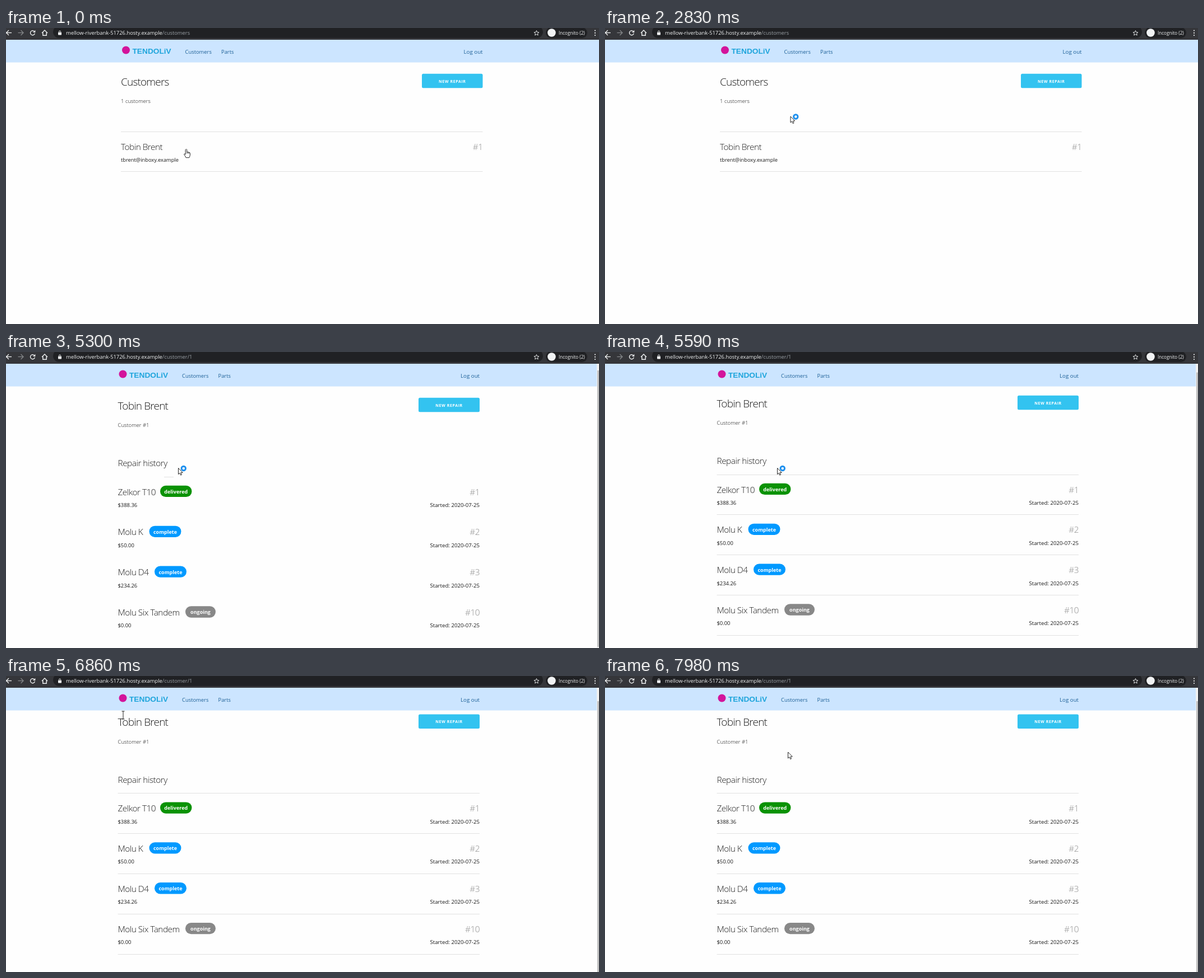
An HTML page with a canvas for the animation above (8 s loop, 1058 by 529 pixels).

```html
<!DOCTYPE html>
<html lang="en">
<head>
<meta charset="utf-8">
<title>Repair shop customers</title>
<style>
  html, body { margin: 0; width: 100%; height: 100%; overflow: hidden; background: #fefefe; }
  canvas { display: block; }
</style>
</head>
<body>
<canvas id="stage" width="1058" height="529"></canvas>
<script>
const ctx = document.getElementById('stage').getContext('2d');
const LOOP = 8000;
const SANS = '"Open Sans", "Noto Sans", sans-serif';
const CUSTOMER = 'Tobin Brent';
const HOST = 'mellow-riverbank-51726.hosty.example';
const BLUE = '#3390ff';
const INK = '#1a1a1a';
const PITCH = 71.85;

const REPAIRS = [
  { name: 'Zelkor T10', price: '$388.36', id: '#1', tag: 'delivered', color: '#0b9204', x: 275, w: 56.5 },
  { name: 'Molu K', price: '$50.00', id: '#2', tag: 'complete', color: '#0099ff', x: 255.5, w: 57 },
  { name: 'Molu D4', price: '$234.26', id: '#3', tag: 'complete', color: '#0099ff', x: 265, w: 57 },
  { name: 'Molu Six Tandem', price: '$0.00', id: '#10', tag: 'ongoing', color: '#888888', x: 320, w: 54 }
];

// Pointer steps: start time, shape, hot spot
const POINTER = [
  [0, 'hand', 321.5, 216.5],
  [660, 'hand', 262, 214], [790, 'hand', 211.5, 206], [920, 'hand', 470, 202],
  [1050, 'hand', 833, 206], [1180, 'arrow', 700, 150], [1310, 'arrow', 510, 90],
  [1440, 'hand', 360, 38], [1570, 'hand', 342, 43.5],
  [1940, 'busy', 352, 50], [2060, 'busy', 344, 98], [2180, 'busy', 337, 144],
  [2830, 'busy', 331, 158], [2950, 'busy', 310, 188], [3080, 'hand', 291.5, 218],
  [3510, 'busy', 291, 217], [3710, 'hand', 291.5, 218],
  [4860, 'hand', 283, 217], [5010, 'arrow', 292, 190],
  [5150, 'arrow', 301, 199], [5300, 'busy', 307.5, 207.5],
  [6330, 'arrow', 290, 180], [6465, 'arrow', 246, 124], [6600, 'beam', 209, 84],
  [6735, 'beam', 209, 70], [6870, 'beam', 232, 78], [7000, 'beam', 262, 84],
  [7135, 'beam', 288, 90], [7270, 'arrow', 310, 100],
  [7390, 'ring', 319.5, 120], [7540, 'ring', 321, 124],
  [7690, 'arrow', 323, 128], [7840, 'arrow', 325, 133], [7980, 'arrow', 326.5, 136]
];

function pointerAt(t) {
  return POINTER.findLast(p => p[0] <= t);
}

function rect(x, y, w, h, color, r = 0) {
  ctx.fillStyle = color;
  ctx.beginPath();
  ctx.roundRect(x, y, w, h, r);
  ctx.fill();
}

function disc(x, y, r, color) {
  ctx.fillStyle = color;
  ctx.beginPath();
  ctx.arc(x, y, r, 0, Math.PI * 2);
  ctx.fill();
}

function path(points, close) {
  ctx.beginPath();
  points.forEach(([x, y]) => ctx.lineTo(x, y));
  if (close) ctx.closePath();
}

function stroke(points, color, width = 1.3, close = false) {
  path(points, close);
  ctx.strokeStyle = color;
  ctx.lineWidth = width;
  ctx.stroke();
}

function text(str, x, y, size, color, { weight = 400, align = 'left', gap = 0, font = SANS } = {}) {
  ctx.font = `${weight} ${size}px ${font}`;
  ctx.letterSpacing = gap + 'px';
  ctx.textAlign = align;
  ctx.fillStyle = color;
  ctx.fillText(str, x, y);
  return ctx.measureText(str).width;
}

const heading = (str, x, y, color = INK) =>
  text(str, x, y, 19, color, { weight: 300, gap: -0.8 });
const title = (str, x, y, color = INK, align = 'left') =>
  text(str, x, y, 15.4, color, { weight: 300, gap: -0.5, align });
const note = (str, x, y, color = '#111') =>
  text(str, x, y, 9.5, color, { weight: 300 });
const divider = (x, y, w) => rect(x, Math.round(y), w, 1, '#e1e1e1');

function button(x, y, w) {
  rect(x, y, w, 25.5, '#33c3f0', 2.5);
  text('NEW REPAIR', x + w / 2, y + 16, 7, '#fff', { weight: 700, gap: 0.6, align: 'center' });
}

function browserBar(t) {
  const white = '#f1f3f4';
  rect(0, 0, 1058, 21, '#35363a');
  rect(84, -4, 874, 22, '#202124', 11);
  rect(963, -1, 74, 19, '#202124', 9.5);

  stroke([[10, 8.5], [0.5, 8.5]], white);
  stroke([[5, 4], [0.5, 8.5], [5, 13]], white);
  stroke([[21.5, 8.5], [31, 8.5]], '#85878a');
  stroke([[26.5, 4], [31, 8.5], [26.5, 13]], '#85878a');

  if (t >= 3910 && t < 4430) {
    stroke([[44, 5], [51, 12]], white);
    stroke([[51, 5], [44, 12]], white);
  } else {
    ctx.strokeStyle = white;
    ctx.lineWidth = 1.4;
    ctx.beginPath();
    ctx.arc(47.5, 8.7, 4, 0.25, Math.PI * 1.75);
    ctx.stroke();
    ctx.fillStyle = white;
    path([[52.3, 3.8], [52.3, 8], [48, 8]], true);
    ctx.fill();
  }

  stroke([[64, 9], [69, 4], [74, 9]], white, 1.4);
  stroke([[65.8, 8], [65.8, 13.2], [72.2, 13.2], [72.2, 8]], white, 1.4);

  rect(93, 7.5, 6, 5, white, 0.7);
  ctx.strokeStyle = white;
  ctx.lineWidth = 1;
  ctx.beginPath();
  ctx.arc(96, 6.8, 1.7, Math.PI, 0);
  ctx.stroke();

  const w = text(HOST, 107, 12, 9.4, white);
  text(t < 4180 ? '/customers' : '/customer/1', 107 + w, 12, 9.4, '#9aa0a6');

  const star = Array.from({ length: 10 }, (_, i) => {
    const a = -Math.PI / 2 + i * Math.PI / 5, r = i % 2 ? 2.1 : 4.7;
    return [946.5 + r * Math.cos(a), 9.2 + r * Math.sin(a)];
  });
  stroke(star, white, 0.9, true);
  disc(973.5, 8.5, 7.3, white);
  text('Incognito (2)', 986, 11.7, 8.1, white);
  [4.5, 8.8, 13].forEach(y => disc(1051, y, 1.1, white));
}

function siteHeader(x, w) {
  rect(0, 21, w, 40.5, '#cce5ff');
  disc(x + 9, 39.5, 7, '#d3149b');
  text('TENDOLiV', x + 20.5, 46.2, 13.7, '#1fa5dc', { weight: 700, font: '"Liberation Sans", Arial, sans-serif' });
  const link = '#1c5f96';
  text('Customers', x + 114.5, 45.5, 9.4, link);
  text('Parts', x + 179, 45.5, 9.4, link);
  text('Log out', x + 645.5, 45.5, 9.7, link, { align: 'right' });
}

function customerList() {
  heading('Customers', 205, 102.6);
  button(742, 81.8, 108.5);
  note('1 customers', 205, 134.2);
  divider(205, 185, 645.5);
  title(CUSTOMER, 205, 217.6);
  title('#1', 850.5, 217.6, '#8c8c8c', 'right');
  text('tbrent@inboxy.example', 205, 239, 9.3, INK);
  divider(205, 256, 645.5);
}

function loadingPage() {
  button(739, 81.8, 111.5);
  note('Customer #1', 205, 126.2);
  title('Repair history', 205, 195.6);
}

// Selected words get a blue box and white letters
function marked(draw, str, x, y, from, to, top, h) {
  const full = draw(str, x, y);
  if (to <= from) return;
  const end = Math.min(to, x + full + 5);
  rect(from, top, end - from, h, BLUE);
  ctx.save();
  ctx.beginPath();
  ctx.rect(from, top, end - from, h);
  ctx.clip();
  draw(str, x, y, '#fff');
  ctx.restore();
}

function customerPage(t, scroll) {
  const x = 199.5, right = 845, firstLine = 222.6;
  const dragging = t >= 6870 && t < 7690;
  const both = t >= 7390;
  const nameEnd = !dragging ? 0 : t >= 7135 ? 999 : pointerAt(t)[2];

  ctx.save();
  ctx.translate(0, -scroll);
  marked(heading, CUSTOMER, x, 102.6, 208.5, nameEnd, 82.4, 26.6);
  marked(note, 'Customer #1', x, 134.2, x, dragging && both ? 253 : 0, 123, 15.5);
  button(736, 81.8, 109);
  title('Repair history', x, 204);
  REPAIRS.forEach((r, i) => {
    const y = PITCH * i;
    title(r.name, x, 255.6 + y);
    rect(r.x, 238.8 + y, r.w, 20.3, r.color, 10.1);
    text(r.tag, r.x + r.w / 2, 252.8 + y, 9, '#fff', { weight: 700, align: 'center' });
    text(r.price, x, 276.9 + y, 9.4, INK);
    title(r.id, right, 255.6 + y, '#8c8c8c', 'right');
    text('Started: 2020-07-25', right, 276.9 + y, 9.7, INK, { align: 'right' });
  });
  ctx.restore();

  if (t >= 5590) {
    for (let i = 0; i < 5; i++) divider(x, firstLine - scroll + PITCH * i, 645.5);
  } else if (t >= 4860) {
    divider(282, firstLine, 17);
  }
}

function scrollbar(scroll) {
  rect(1054, 21, 4, 508, '#f1f1f1');
  rect(1055, 33 + scroll * 0.9, 3, 494, '#c1c1c1');
}

function arrow(x, y) {
  ctx.save();
  ctx.translate(x, y);
  path([[0, 0], [0, 11], [2.5, 8.8], [4.2, 12.6], [6, 11.8], [4.4, 8.2], [7.8, 8]], true);
  ctx.fillStyle = '#fff';
  ctx.fill();
  ctx.strokeStyle = '#111';
  ctx.lineWidth = 0.9;
  ctx.stroke();
  ctx.restore();
}

function hand(x, y) {
  ctx.save();
  ctx.translate(x, y);
  ctx.beginPath();
  ctx.moveTo(-1.3, 9.5);
  ctx.lineTo(-1.3, 1);
  ctx.quadraticCurveTo(0, -1, 1.3, 1);
  ctx.lineTo(1.3, 5);
  ctx.lineTo(5.5, 5.8);
  ctx.quadraticCurveTo(7, 6.2, 7, 8);
  ctx.lineTo(6.8, 11);
  ctx.quadraticCurveTo(6.5, 13, 5.3, 15.2);
  ctx.lineTo(-0.4, 15.2);
  ctx.quadraticCurveTo(-1.2, 13, -3.7, 9.7);
  ctx.quadraticCurveTo(-4, 7.2, -1.3, 9.5);
  ctx.closePath();
  ctx.fillStyle = '#fff';
  ctx.fill();
  ctx.strokeStyle = '#222';
  ctx.lineWidth = 1;
  ctx.stroke();
  stroke([[1.3, 5], [1.3, 8]], '#222', 0.8);
  stroke([[3.3, 5.6], [3.3, 8]], '#222', 0.8);
  stroke([[5.2, 6], [5.2, 8.2]], '#222', 0.8);
  ctx.restore();
}

function beam(x, y) {
  stroke([[x, y - 7], [x, y + 7]], '#222', 1);
  stroke([[x - 2.5, y - 7], [x + 2.5, y - 7]], '#222', 1);
  stroke([[x - 2.5, y + 7], [x + 2.5, y + 7]], '#222', 1);
}

function circle(x, y, r, color, width) {
  ctx.strokeStyle = color;
  ctx.lineWidth = width;
  ctx.beginPath();
  ctx.arc(x, y, r, 0, Math.PI * 2);
  ctx.stroke();
}

function pointer(t) {
  const [start, shape, x, y] = pointerAt(t);
  if (shape === 'hand') return hand(x, y);
  if (shape === 'beam') return beam(x, y);
  if (shape === 'ring') circle(x + 0.8, y + 1.3, start < 7500 ? 6.8 : 4, '#333', 1);
  arrow(x, y);
  if (shape === 'busy') {
    disc(x + 9.3, y + 0.5, 5.6, '#fff');
    circle(x + 9.3, y + 0.5, 3.7, '#1e90ee', 3);
  }
}

function draw(t) {
  const wide = t < 4570;
  const scroll = t < 5590 ? 0 : t < 5725 ? 4 : t < 5860 ? 10 : 13.4;
  rect(0, 0, 1058, 529, '#fefefe');
  if (t < 4430) customerList();
  else if (wide) loadingPage();
  else customerPage(t, scroll);
  if (!wide) scrollbar(scroll);
  siteHeader(wide ? 205 : 199.5, wide ? 1058 : 1054);
  browserBar(t);
  pointer(t);
}

const began = performance.now();
function tick() {
  draw((performance.now() - began) % LOOP);
  requestAnimationFrame(tick);
}
tick();
</script>
</body>
</html>
```
